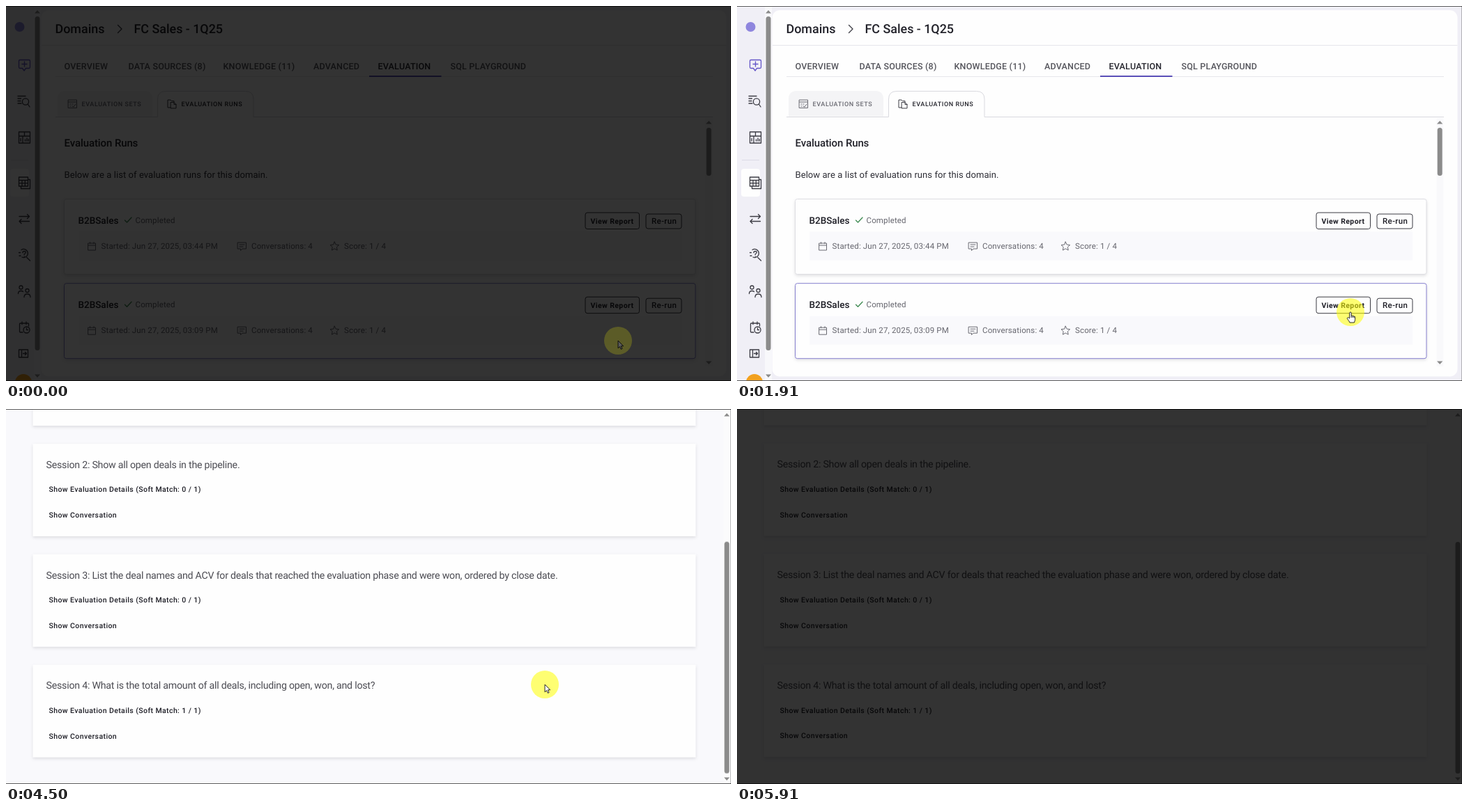
An HTML page that plays this animation: 1040x539 px, repeating every 6000 ms.

```html
<!DOCTYPE html>
<html lang="en">
<head>
<meta charset="utf-8">
<title>Evaluation runs</title>
<style>
html, body { margin: 0; width: 100%; height: 100%; overflow: hidden; background: #000; }
svg { display: block; width: 1040px; height: 539px; }
text { font-family: Roboto, "Open Sans", sans-serif; white-space: pre; text-rendering: geometricPrecision; }

.crumb { font-size: 17.9px; font-weight: 500; fill: #22222a; }
.tab { font-size: 12.5px; font-weight: 500; letter-spacing: .2px; fill: #55555c; }
.sub { font-size: 9px; font-weight: 500; letter-spacing: .6px; fill: #6a6a72; }
.on { fill: #24242c; }
.head { font-size: 15px; font-weight: 500; letter-spacing: -.1px; fill: #22222a; }
.body { font-size: 13px; letter-spacing: .07px; fill: #2e2e36; }
.name { font-size: 13.5px; font-weight: 500; fill: #1c1c24; }
.meta { font-size: 11.5px; letter-spacing: .15px; fill: #66666e; }
.btn { font-size: 10.5px; font-weight: 500; letter-spacing: .4px; fill: #1e1e26; }
.view { font-weight: 700; }
.rerun { font-size: 11.5px; }
.title { font-size: 14.2px; letter-spacing: -.23px; fill: #4c4c53; }
.dark { fill: #1a1a22; }
.link { fill: #6253c4; }

.icon { fill: none; stroke: #3c3c44; stroke-width: 1.3; stroke-linejoin: round; stroke-linecap: round; }
.thin { stroke: #6a6a72; stroke-width: 1; }
.thumb { fill: #8b8b8b; }
.card { fill: #fefefe; filter: drop-shadow(0 2px 2px rgba(30, 30, 50, .13)); }

.list, .report, .doc, .bar, .fade, .cursor, .spot, .ptr, .arrow, .hand { animation: 6s linear infinite; }
.list { animation-name: list; animation-timing-function: step-end; }
.report { animation-name: report; animation-timing-function: step-end; }
.doc { animation-name: doc; }
.bar { animation-name: bar; }
.fade { animation-name: fade; }
.cursor { animation-name: move; }
.spot { animation-name: spot; }
.ptr { animation-name: ptr; }
.arrow { animation-name: arrow; animation-timing-function: step-end; }
.hand { animation-name: hand; animation-timing-function: step-end; }

@keyframes list { 0% { visibility: visible } 33.3%, 100% { visibility: hidden } }
@keyframes report { 0% { visibility: hidden } 33.3%, 100% { visibility: visible } }
@keyframes doc {
  0%, 41.8% { transform: translateY(0) }
  51.33% { transform: translateY(-94px) }
  66.67% { transform: translateY(-244px); animation-timing-function: cubic-bezier(.33, .67, .67, 1) }
  76%, 100% { transform: translateY(-287.5px) }
}
@keyframes bar {
  0%, 41.8% { transform: translateY(0) }
  51.33% { transform: translateY(57.5px) }
  66.67% { transform: translateY(150.5px); animation-timing-function: cubic-bezier(.33, .67, .67, 1) }
  76%, 100% { transform: translateY(177px) }
}
@keyframes fade {
  0% { opacity: .8; animation-timing-function: steps(8) }
  11% { opacity: 0 }
  94.33% { opacity: 0; animation-timing-function: steps(4, start) }
  99.9%, 100% { opacity: .8 }
}
@keyframes spot { 0% { opacity: .2; animation-timing-function: steps(8) } 11%, 100% { opacity: .55 } }
@keyframes ptr { 0% { filter: brightness(.35); animation-timing-function: steps(8) } 11%, 100% { filter: brightness(1) } }
@keyframes move {
  0%, 11.2% { transform: translate(878px, 481px); visibility: visible }
  12.5% { transform: translate(877px, 479px) }
  18%, 19.5% { transform: translate(877px, 478.5px); animation-timing-function: ease-in-out }
  31%, 32% { transform: translate(880px, 440px); animation-timing-function: ease-in-out }
  36%, 83.4% { transform: translate(773px, 396px); animation-timing-function: ease-in }
  88.9% { transform: translate(968px, 380px); visibility: visible; animation-timing-function: step-end }
  90%, 100% { transform: translate(968px, 380px); visibility: hidden }
}
@keyframes arrow { 0% { opacity: 1 } 29.1% { opacity: 0 } 33.3%, 100% { opacity: 1 } }
@keyframes hand { 0% { opacity: 0 } 29.1% { opacity: 1 } 33.3%, 100% { opacity: 0 } }
</style>
</head>
<body>
<svg viewBox="0 0 1040 539" xmlns="http://www.w3.org/2000/svg">
  <g class="list">
    <rect width="1040" height="539" fill="#f0eff6"/>
    <rect x="40" width="10" height="539" fill="#f8f8fb"/>
    <rect x="50.5" y="6" width="983" height="526.5" rx="11" fill="#fefefe"/>

    <!-- sidebar -->
    <circle cx="19.5" cy="30" r="7" fill="#8f86de"/>
    <circle cx="25" cy="541" r="12" fill="#f2a11f"/>
    <path d="M7 221.5H32" stroke="#dcdbe6"/>
    <rect x="6" y="234" width="27" height="40" rx="4" fill="#fefefe"/>
    <g class="icon">
      <path stroke="#6355c8" d="M20 77.500H33Q34.500 77.500 34.500 79V88Q34.500 89.500 33 89.500H28.500L26 93L23.500 89.500H20Q18.500 89.500 18.500 88V79Q18.500 77.500 20 77.500ZM26.500 80V87M23 83.500H30"/>
      <path d="M17 129.500H28M17 133H21.500M17 136.500H21M17 140H22M31.300 141L34 145"/>
      <circle cx="28" cy="137.500" r="4.600"/>
      <path d="M18.500 181H34.500V197H18.500ZM18.500 187H34.500M26.500 181V187M24 187V197M21 190.500V194M27.500 194V192M30 194V190M32.300 194V191.500"/>
      <path d="M18.500 246H31.500V259H18.500ZM18.500 250.500H31.500M18.500 254.700H31.500M23 250.500V259M27.300 250.500V259M31.500 249.500H34.500V262.500H21.500V259"/>
      <path d="M19 302.500H33.500M30.500 299.500L33.500 302.500L30.500 305.500M33.500 309.500H19M22 306.500L19 309.500L22 312.500"/>
      <path d="M22 350.500A6 6 0 1 1 23 361M29.800 361.500L34.500 366M24 354.500Q24 352.500 26 352.500Q28.200 352.500 28.200 354.300Q28.200 355.700 26.200 356.500V357.500M26.200 360V360.100M18.500 354.500H20.500M19 359H21"/>
      <circle cx="21.500" cy="404.500" r="2.500"/>
      <circle cx="30.500" cy="409" r="2.500"/>
      <path d="M17.500 413.500Q17.500 409.500 21.500 409.500Q23.500 409.500 24.500 410.500M26 418.500Q26 414 30.500 414Q35 414 35 418.500"/>
      <path d="M24 469H20.500Q19.500 469 19.500 468V457Q19.500 456 20.500 456H31.500Q32.500 456 32.500 457V460M23 454V457.500M29 454V457.500M29.500 463V465.500H31.500"/>
      <circle cx="29.500" cy="465.500" r="4.500"/>
      <path d="M18.500 494H31.500V505H18.500ZM22.500 494V505M24.500 499.500H29.500M27.500 497.500L29.500 499.500L27.500 501.500"/>
    </g>
    <rect class="thumb" x="41.500" y="15" width="7" height="480" rx="3.500"/>
    <path class="thumb" d="M41 10.500L45 6L49 10.500ZM41 529.500L45 534L49 529.500Z"/>

    <!-- header and tabs -->
    <path d="M51 56.500H1033.500M71 101.500H1014" stroke="#e6e6eb"/>
    <path class="icon" d="M160.500 27.500L166 33L160.500 38.500"/>
    <rect x="521" y="100" width="103.500" height="2" fill="#5a4fb8"/>
    <path d="M74 158.500V134Q74 122 86 122H198Q210 122 210 134V158.500Z" fill="#f4f4f6"/>
    <path d="M71 159.500H217.500V134Q217.500 122.500 229 122.500H343.500Q355 122.500 355 134V159.500H1014" fill="none" stroke="#d9d9df"/>
    <g class="icon thin">
      <path d="M89.500 135H101.500V146.500H89.500ZM89.500 138H101.500M92 141H93M95 141H96M92 144H93M95 144L97 145L100 141"/>
      <path stroke="#3c3c44" d="M236 146H232V135H236L237.500 136.500H241V138M236.500 138.500H241L244 141.500V147H236.500ZM241 138.500V141.500H244"/>
    </g>
    <rect x="1003.500" y="161" width="10" height="357" fill="#f9f9fb"/>
    <rect class="thumb" x="1004.700" y="175" width="7" height="69" rx="3.500"/>
    <path class="thumb" d="M1004 169.500L1008.200 165L1012.400 169.500ZM1004 510.500L1008.200 515L1012.400 510.500Z"/>
    <g id="runs"></g>
  </g>

  <g class="report">
    <rect width="1040" height="539" fill="#f9f9fc"/>
    <g class="doc" id="doc"></g>
    <rect x="1029" width="11" height="539" fill="#fbfbfc"/>
    <rect class="thumb bar" x="1030.500" y="14" width="7" height="333" rx="3.500"/>
    <path class="thumb" d="M1030 10.500L1034 6L1038 10.500ZM1030 529.500L1034 534L1038 529.500Z"/>
  </g>

  <path d="M0 .5H1040M0 538.500H1040" stroke="#5c5c5c"/>
  <path d="M1039.500 0V539" stroke="#000" opacity=".25"/>
  <rect class="fade" width="1040" height="539"/>

  <g class="cursor">
    <circle class="spot" r="20" fill="#ff0"/>
    <g class="ptr" fill="#fff" stroke="#111" stroke-width=".9" stroke-linejoin="round">
      <path class="arrow" d="M0 0V10.800L2.500 8.500L4.200 12.300L6 11.500L4.300 7.800H7.600Z"/>
      <path class="hand" d="M-1.300 9V1.200Q-1.300 0 0 0Q1.200 0 1.200 1.200V5.200Q2.300 4.500 3.300 5.600Q4.400 5 5.200 6.200Q6.600 5.700 6.600 7.300V10.500Q6.600 12.500 5.300 15H-1Q-2 12.500-4.600 9.500Q-5 8-3.600 7.800Q-2.500 7.800-1.300 9ZM1.200 5.200V8M3.300 5.600V8M5.200 6.200V8.200"/>
    </g>
  </g>
</svg>
<script>
const text = (x, y, cls, s) => `<text x="${x}" y="${y}" class="${cls}">${s}</text>`;
const box = (x, y, w, h, more) => `<rect x="${x}" y="${y}" width="${w}" height="${h}" ${more}/>`;

const labels = [
  [70.5, 39, 'crumb', 'Domains'], [183.5, 39, 'crumb', 'FC Sales - 1Q25'],
  [83.5, 90.5, 'tab', 'OVERVIEW'], [175.5, 90.5, 'tab', 'DATA SOURCES (8)'],
  [311.5, 90.5, 'tab', 'KNOWLEDGE (11)'], [441, 90.5, 'tab', 'ADVANCED'],
  [533.5, 90.5, 'tab on', 'EVALUATION'], [637.5, 90.5, 'tab', 'SQL PLAYGROUND'],
  [108.5, 143.8, 'sub', 'EVALUATION SETS'], [251.5, 143.8, 'sub on', 'EVALUATION RUNS'],
  [83.5, 202, 'head', 'Evaluation Runs'],
  [83.5, 246.5, 'body', 'Below are a list of evaluation runs for this domain.']
];

// one run card, drawn from its own top edge
const run = (y, time, edge) => `<g transform="translate(0 ${y})">
  ${box(83.5, 0, 905.5, 108, `rx="3" class="card" stroke="${edge}"`)}
  ${box(104, 47, 865, 41, 'fill="#f9f9fc"')}
  ${text(103.5, 35, 'name', 'B2BSales')}
  <path class="icon" stroke-width="1.2" style="stroke:#3d8a50" d="M170.500 30.500L173.500 33.500L180 26.500"/>
  ${text(185.5, 34.5, 'meta', 'Completed')}
  <g class="icon thin">
    <path d="M118 63.500H128.500V73.500H118ZM118 66.500H128.500M120.500 62V64M126 62V64"/>
    <path d="M332.500 62.500H344.500V71.500H339L336.500 74V71.500H332.500ZM335 65.500H342M335 68.500H340"/>
    <path d="M471.300 61.500L473.200 65.500L477.600 66L474.400 69L475.200 73.500L471.300 71.300L467.400 73.500L468.200 69L465 66L469.400 65.500Z"/>
  </g>
  ${text(136.5, 71.6, 'meta', `Started: Jun 27, 2025, ${time} PM`)}
  ${text(352, 71.6, 'meta', 'Conversations: 4')}
  ${text(485, 71.6, 'meta', 'Score: 1 / 4')}
  ${box(831, 19.5, 77.5, 23.5, 'rx="3" fill="#fefefe" stroke="#3a3a42"')}
  ${text(838.5, 35.7, 'btn view', 'View Report')}
  ${box(918, 21.5, 51, 21, 'rx="3" fill="#fefefe" stroke="#3a3a42"')}
  ${text(926, 35.7, 'btn rerun', 'Re-run')}
</g>`;

document.getElementById('runs').innerHTML =
  labels.map(l => text(...l)).join('') + run(277.5, '03:44', '#dedee3') + run(398.7, '03:09', '#8780cf');

const questions = [
  'Calculate total revenue for closed won opportunities using ACV.',
  'Show all open deals in the pipeline.',
  'List the deal names and ACV for deals that reached the evaluation phase and were won, ordered by close date.',
  'What is the total amount of all deals, including open, won, and lost?'
];

const session = (q, i) => `<g transform="translate(0 ${178 + i * 158.9})">
  ${box(38.5, 0, 951, 133, 'class="card"')}
  ${text(57.5, 34.8, 'title', `Session ${i + 1}: ${q}`)}
  ${text(61.5, 69.5, 'btn', `Show Evaluation Details (Soft Match: ${i === 3 ? 1 : 0} / 1)`)}
  ${text(61.5, 106.3, 'btn', 'Show Conversation')}
</g>`;

document.getElementById('doc').innerHTML =
  text(38.5, 101, 'title link', 'View Domain') +
  text(38.5, 134.5, 'title dark', 'Soft Match: 1 / 4') +
  questions.map(session).join('');
</script>
</body>
</html>
```
